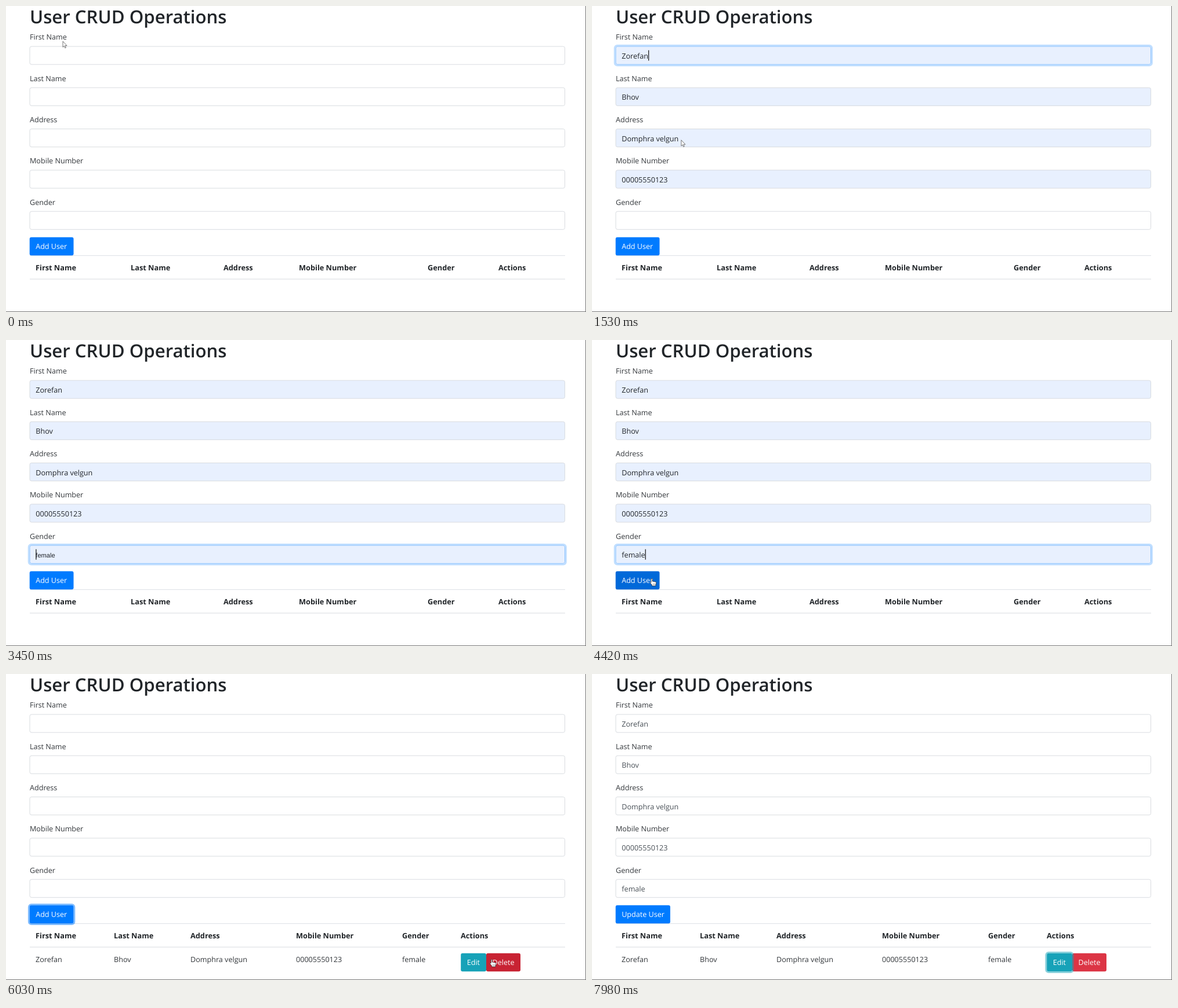
Animation of 1000 by 529 pixels, one loop 8000 ms. Source, as an HTML page:

```html
<!DOCTYPE html>
<html lang="en">
<head>
<meta charset="utf-8">
<title>User CRUD Operations</title>
<style>
  html, body { margin: 0; height: 100%; overflow: hidden; background: #fff; }
  svg { display: block; width: 100vw; height: 100vh; }
  text { font: 12.6px "Open Sans", "Noto Sans", sans-serif; fill: #212529; text-rendering: geometricPrecision; }
  .title { font-size: 31.2px; font-weight: 600; }
  .label { fill: #33373b; }
  .head { font-size: 12.75px; font-weight: 700; }
  .value { fill: #495057; }
  .preview { font: 11.1px "Liberation Sans", Arial, sans-serif; }
  .button { fill: #fff; }
</style>
</head>
<body>
<svg id="stage" viewBox="0 0 1000 529"></svg>
<script>
const LOOP = 8000, STEP = 96, BLINK = 490;
const stage = document.getElementById('stage');
const labels = ['First Name', 'Last Name', 'Address', 'Mobile Number', 'Gender'];
const user = ['Zorefan', 'Bhov', 'Domphra velgun', '00005550123', 'female'];
const emptyColumns = [51, 215, 375, 505, 727, 849];
const filledColumns = [51, 186, 318, 500, 683, 784];

// Moments of the session, in ms
const at = {
  focusFirst: 570, previewFirst: 1230, fillFirst: 1420,
  focusGender: 2160, previewGender: 3440, fillGender: 3930,
  add: 4510, edit: 7290
};

// Pointer path: time, x, y of the tip, look until the next entry
const path = [
  [0, 98, 61, 'arrow'], [100, 98, 61, 'arrow'], [290, 95, 80, ''],
  [1330, 115, 125, 'arrow'], [1530, 154, 231, 'arrow'], [1720, 150, 255, 'arrow'],
  [2060, 118, 350, ''], [4310, 112, 393, 'arrow'], [4400, 104, 411, 'hand'],
  [4510, 98, 418, 'hand'], [5100, 98, 418, 'hand'], [5180, 128, 424, 'arrow'],
  [5760, 826, 486, 'hand'], [5930, 846, 495, 'hand'], [6030, 839, 493, 'hand'],
  [6400, 803, 493, 'hand'], [7390, 803, 493, 'hand'], [7490, 780, 470, 'arrow'],
  [7680, 720, 380, ''], [LOOP, 700, 365, '']
];

const cursors = {
  arrow: '<path d="M0 0V10.2L2.3 8.1 3.8 11.7 5.4 11 3.9 7.5H7Z" fill="#fff" stroke="#555" stroke-width=".8"/>',
  hand: '<path d="M-1 1Q0-.6 1 1V5L7 6.3Q8 6.7 7.7 8L6.8 11V13H0V11L-3 7.6Q-3.3 5.8-1 7Z" fill="#fff" stroke="#222" stroke-width=".7"/>' +
        '<path d="M2.2 9V11.5M4 9V11.5M5.7 9V11.5" stroke="#555" stroke-width=".6"/>'
};

const pen = document.createElement('canvas').getContext('2d');
function textWidth(string) {
  pen.font = '12.6px "Open Sans", "Noto Sans", sans-serif';
  return pen.measureText(string).width;
}

const text = (x, y, string, kind) => `<text x="${x}" y="${y}" class="${kind}">${string}</text>`;
const box = (x, y, w, h, r, paint) => `<rect x="${x}" y="${y}" width="${w}" height="${h}" rx="${r}" ${paint}/>`;
const line = (y, width) => box(41, y, 923, width, 0, 'fill="#dee2e6"');
const ring = (x, y, w, h, color, opacity) =>
  box(x - 1.4, y - 1.4, w + 2.8, h + 2.8, 4.5, `fill="none" stroke="${color}" stroke-opacity="${opacity}" stroke-width="2.8"`);

function pointerAt(t) {
  const i = path.findIndex((key, n) => n === path.length - 2 || t < path[n + 1][0]);
  const [t0, x0, y0, look] = path[i], [t1, x1, y1] = path[i + 1];
  const k = (t - t0) / (t1 - t0);
  return { x: x0 + (x1 - x0) * k, y: y0 + (y1 - y0) * k, look };
}

function fieldState(i, t) {
  const gender = i === 4;
  const preview = gender ? at.previewGender : at.previewFirst;
  const fill = gender ? at.fillGender : at.fillFirst;
  if (t >= at.edit) return 'value';
  if (t >= at.add || t < preview) return '';
  return t < fill ? 'preview' : 'filled';
}

function field(i, t, focused) {
  const y = 69.9 + i * 71.3, state = fieldState(i, t);
  const tinted = state === 'preview' || state === 'filled';
  let out = text(41, y - 11.5, labels[i], 'label');
  if (focused) out += ring(40.5, y - .4, 923.5, 32, '#007bff', .25);
  out += box(41, y, 922.5, 31.2, 3, `fill="${tinted ? '#e8f0fe' : '#fff'}" stroke="${focused ? '#80bdff' : '#d5d9dd'}" stroke-width=".9"`);
  if (state) out += text(51.3, y + 21, user[i], state);
  if (!focused) return out;

  const marks = i ? [at.focusGender, at.fillGender] : [at.focusFirst, at.fillFirst];
  const since = t < marks[1] ? marks[0] : marks[1];
  if ((t - since) % (2 * BLINK) < BLINK) {
    const x = state === 'filled' ? 51.3 + textWidth(user[i]) : 51.3;
    out += box(x, y + 6.6, 1.2, 18, 0, 'fill="#111"');
  }
  return out;
}

function button(x, y, w, label, colors, focused, pointer) {
  const hover = pointer.look === 'hand' && pointer.x >= x && pointer.x < x + w &&
    pointer.y >= y && pointer.y < y + 31.5;
  return (focused ? ring(x, y, w, 31.5, colors[0], .5) : '') +
    box(x, y, w, 31.5, 3, `fill="${colors[hover ? 1 : 0]}"`) +
    text(x + 10.5, y + 20.6, label, 'button');
}

function draw(t) {
  const pointer = pointerAt(t), added = t >= at.add, editing = t >= at.edit;
  const focus = t < at.focusFirst || added ? -1 : t < at.focusGender ? 0 : 4;
  const columns = added ? filledColumns : emptyColumns;

  let out = box(0, 0, 1000, 529, 0, 'fill="#fff"') + text(41, 29.5, 'User CRUD Operations', 'title');
  labels.forEach((_, i) => out += field(i, t, i === focus));
  out += line(431, 1) + line(471.5, 1.2);
  out += button(40.7, 399.8, editing ? 94.2 : 75.8, editing ? 'Update User' : 'Add User',
    ['#007bff', '#0069d9'], added && !editing, pointer);
  [...labels, 'Actions'].forEach((label, i) => out += text(columns[i], 457, label, 'head'));
  if (added) {
    user.forEach((value, i) => out += text(columns[i], 498, value, 'label'));
    out += button(828, 482.8, 59, 'Delete', ['#dc3545', '#c82333'], false, pointer);
    out += button(784.2, 482.8, 43.8, 'Edit', ['#17a2b8', '#138496'], editing, pointer);
  }
  out += box(0, 528, 1000, 1, 0, 'fill="#777"') + box(999, 0, 1, 529, 0, 'fill="#777"');
  if (pointer.look) out += `<g transform="translate(${pointer.x} ${pointer.y})">${cursors[pointer.look]}</g>`;
  stage.innerHTML = out;
}

let shown = -1;
const start = performance.now();
function tick() {
  const step = Math.floor(((performance.now() - start) % LOOP + 20) / STEP);
  if (step !== shown) draw((shown = step) * STEP);
  requestAnimationFrame(tick);
}
tick();
</script>
</body>
</html>
```
